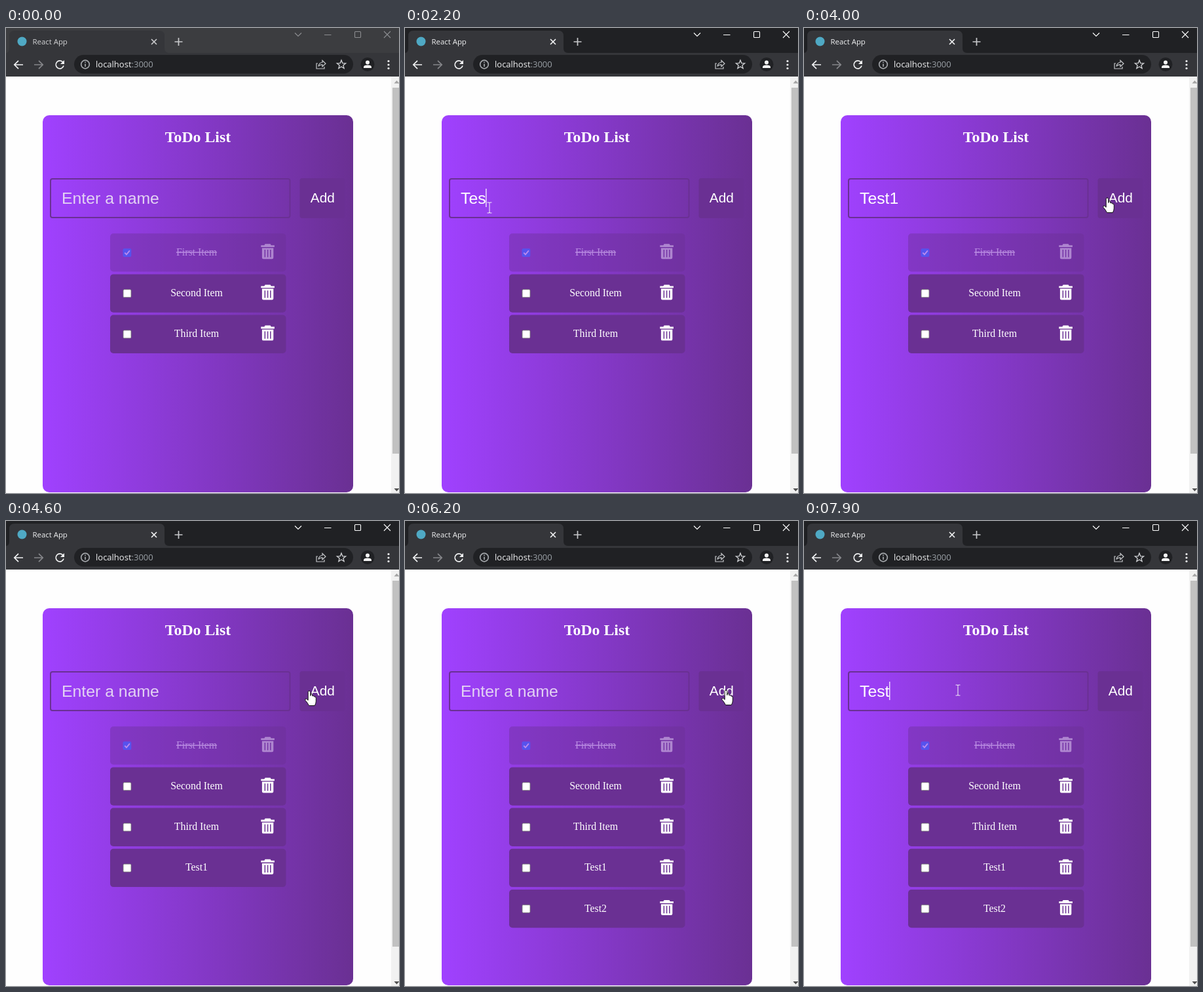
Animation of 600x709 px, one loop 8 s. Source, as an HTML page:

```html
<!DOCTYPE html>
<html lang="en">
<head>
<meta charset="utf-8">
<title>ToDo List</title>
<style>
  html, body { margin: 0; width: 100%; height: 100%; overflow: hidden; background: #fefefe; }
  svg { display: block; width: 600px; height: 709px; }
  .ui { font-family: "Open Sans", "Noto Sans", sans-serif; }
  .sans { font-family: "Liberation Sans", Arial, sans-serif; }
  .serif { font-family: "Liberation Serif", "Times New Roman", serif; fill: #fff; text-anchor: middle; }
  .line { fill: none; stroke-width: 1.7; }
</style>
</head>
<body>
<svg viewBox="0 0 600 709">
  <defs>
    <linearGradient id="purple">
      <stop offset="0" stop-color="#a041ff"/>
      <stop offset="1" stop-color="#6a3093"/>
    </linearGradient>
    <g id="trash">
      <path fill="#fff" fill-rule="evenodd" d="M-10.3-9.8H-5.2L-4-11.8H4L5.2-9.8H10.3V-7H-10.3Z
        M-8.7-5.6H8.7V9Q8.7 11.2 6.5 11.2H-6.5Q-8.7 11.2-8.7 9Z
        M-5-3V8.4h1.5V-3Z M-.75-3V8.4h1.5V-3Z M3.5-3V8.4h1.5V-3Z"/>
    </g>
  </defs>

  <!-- Browser frame -->
  <rect width="600" height="709" fill="#fefefe"/>
  <rect id="titlebar" width="600" height="40"/>
  <path fill="#35363a" d="M0 38Q5 38 5 31V12Q5 4 13 4H234Q242 4 242 12V31Q242 38 249 38H600V74H0Z"/>
  <circle cx="24.5" cy="20.5" r="7" fill="#4fa9c4"/>
  <text id="tabName" class="ui" x="40.5" y="25" font-size="11.4">React App</text>
  <path id="tabClose" class="line" d="M222 17l8 8m0-8l-8 8"/>
  <path class="line" stroke="#c8c9cb" d="M263.500 15v12m-6-6h12"/>
  <g id="controls" fill="none" stroke-width="1.1">
    <path d="M441 7.500l5 5 5-5M486 10.500h10.500M577 5l10 10m0-10l-10 10"/>
    <rect x="532.500" y="5.500" width="9" height="9" rx="1"/>
  </g>
  <rect x="104" y="41" width="426" height="28.500" rx="14.200" fill="#202124"/>
  <path class="line" stroke="#f1f2f3" d="M26 56H13m6-6.200L12.800 56l6.200 6.200"/>
  <path class="line" stroke="#85868a" d="M43 56h13m-6-6.200l6.200 6.200-6.200 6.200"/>
  <path class="line" stroke="#f1f2f3" stroke-width="2" d="M87 52.300A6 6 0 1 0 88 57.500"/>
  <path fill="#f1f2f3" d="M89 49v6h-6Z"/>
  <circle class="line" cx="121" cy="55.500" r="6.300" stroke="#a3a6aa" stroke-width="1.4"/>
  <path class="line" stroke="#a3a6aa" d="M121 54.500v4.500m0-7.600v1.600"/>
  <text class="ui" x="137" y="60" font-size="13" fill="#f1f2f3">localhost<tspan fill="#9aa0a6">:3000</tspan></text>
  <path fill="none" stroke="#c4c6c9" stroke-width="1.2" d="M476 54h-2v8h12v-3M477 58.500q1-6 6-6v-3l5 4.700-5 4.600v-3q-4 0-6 2.700Z"/>
  <path id="star" fill="none" stroke="#d0d2d5" stroke-width="1.300"/>
  <circle cx="552" cy="55.500" r="10.500" fill="#202124"/>
  <path fill="#f5f5f5" d="M546 61v-1.200q0-3.200 6-3.200t6 3.200V61Z"/>
  <circle cx="552" cy="52.500" r="3" fill="#f5f5f5"/>
  <g fill="#f1f2f3"><circle cx="584" cy="50.500" r="1.600"/><circle cx="584" cy="56" r="1.600"/><circle cx="584" cy="61.500" r="1.600"/></g>

  <!-- Scrollbar -->
  <rect x="588" y="74" width="12" height="635" fill="#f1f1f1"/>
  <rect x="590" y="91" width="10" height="558" fill="#c1c1c1"/>
  <path fill="#a3a3a3" d="M592.500 84.500l4-4.500 4 4.500Z"/>
  <path fill="#505050" d="M592.500 702l4 4.500 4-4.500Z"/>

  <!-- Todo card -->
  <rect x="56" y="133" width="474" height="575" rx="10" fill="url(#purple)"/>
  <text class="serif" x="293" y="174" font-size="23.8" font-weight="bold">ToDo List</text>
  <rect x="68" y="230" width="365.500" height="59" rx="3" fill="none" stroke="#6a3093" stroke-width="2"/>
  <text id="entry" class="sans" x="85" y="267.500" font-size="24.8"></text>
  <rect id="caret" y="245" width="1.200" height="28" fill="#fff"/>
  <rect x="448.500" y="229" width="69" height="61" rx="4" fill="#6a3093"/>
  <text class="sans" x="483.300" y="266" font-size="20.83" fill="#fff" text-anchor="middle">Add</text>
  <g id="list"></g>

  <!-- Pointers, each with its hot spot at 0,0 -->
  <g id="pointer">
    <path id="beam" fill="none" stroke="#eee8f5" stroke-width="1.100"
      d="M-3.500-8h2.500l1 1 1-1h2.500M0-7V7M-3.500 8h2.500l1-1 1 1h2.500"/>
    <path id="hand" fill="#fff" stroke="#111" stroke-linejoin="round"
      d="M-1.800 1.500Q-1.800 0 0 0t1.800 1.500V7.500Q3-.2 5 8 7 6.300 7.700 9 10 8 10.300 11V16Q10.300 19 8.300 22.500H-.5Q-2.500 18-6 14.500-7 12-4.500 12L-1.800 14.300Z"/>
    <path id="arrow" fill="#fff" stroke="#111" d="M0 0V16.500l3.800-3.600 2.500 6 2.600-1.100-2.500-5.800h5.300Z"/>
  </g>
</svg>
<script>
const LOOP = 8000, STEP = 100;
const PLACEHOLDER = "Enter a name";
const $ = id => document.getElementById(id);

// [time, text in the field, focused]
const edits = [
  [0, "", false], [1000, "", true],
  [2000, "T", true], [2100, "Te", true], [2200, "Tes", true], [2300, "Test", true], [2500, "Test1", true],
  [4300, "", false], [4900, "", true],
  [5200, "T", true], [5300, "Te", true], [5400, "Tes", true], [5500, "Test", true], [5700, "Test2", true],
  [6200, "", false], [7000, "", true],
  [7600, "T", true], [7700, "Te", true], [7800, "Tes", true], [7900, "Test", true]
];

// [time, x, y] of the pointer
const path = [
  [400, 600, 440], [900, 131, 280], [1800, 131, 280], [2200, 129, 274], [3200, 129, 274],
  [3600, 410, 266], [4000, 463, 259], [4300, 472, 258], [4600, 463, 259], [4900, 419, 255],
  [5700, 419, 255], [6100, 490, 258], [6300, 490, 258], [6600, 234, 257], [7300, 235, 258]
];

const items = [
  ["First Item", 0], ["Second Item", 0], ["Third Item", 0], ["Test1", 4300], ["Test2", 6200]
];

function itemMarkup([name], i) {
  const done = i === 0;
  const box = done
    ? `<rect x="178.500" y="23" width="12.800" height="12.800" rx="2" fill="#0075ff"/>
       <path d="M181.300 29.500l2.600 2.700 5-6" fill="none" stroke="#fff" stroke-width="1.800"/>`
    : `<rect x="179" y="23.300" width="12" height="12" rx="1.500" fill="#fff" stroke="#767676" stroke-width=".9"/>`;
  const strike = done ? `text-decoration="line-through"` : "";
  return `<g transform="translate(0 ${313.2 + i * 62.2})" ${done ? 'opacity=".4"' : ""}>
    <rect x="159" width="268.500" height="58.300" rx="5" fill="#6a3093"/>${box}
    <text class="serif" x="291" y="33.500" font-size="15.87" ${strike}>${name}</text>
    <use href="#trash" x="399.600" y="27.800"/></g>`;
}

function starPath(cx, cy, outer, inner) {
  const points = Array.from({ length: 10 }, (_, i) => {
    const r = i % 2 ? inner : outer, a = i * Math.PI / 5;
    return `${cx + r * Math.sin(a)} ${cy - r * Math.cos(a)}`;
  });
  return `M${points.join("L")}Z`;
}

$("list").innerHTML = items.map(itemMarkup).join("");
$("star").setAttribute("d", starPath(512, 56, 7, 3));

const show = (el, on) => el.setAttribute("visibility", on ? "visible" : "hidden");
const within = (x, y, l, t, r, b) => x >= l && x <= r && y >= t && y <= b;

function pointerAt(t) {
  const next = path.findIndex(p => p[0] > t);
  if (next < 0) return path[path.length - 1].slice(1);
  if (next === 0) return null;
  const [t0, x0, y0] = path[next - 1], [t1, x1, y1] = path[next];
  const u = (t - t0) / (t1 - t0), k = u * u * (3 - 2 * u);
  return [x0 + (x1 - x0) * k, y0 + (y1 - y0) * k];
}

function drawWindow(active) {
  $("titlebar").setAttribute("fill", active ? "#202124" : "#3c3d40");
  $("tabName").setAttribute("fill", active ? "#f1f2f3" : "#d3d4d6");
  $("tabClose").setAttribute("stroke", active ? "#f1f2f3" : "#c8c9cb");
  $("controls").setAttribute("stroke", active ? "#fff" : "#8c8d90");
}

function drawField(t) {
  const [since, text, focused] = edits.filter(e => e[0] <= t).pop();
  const entry = $("entry");
  entry.textContent = text || PLACEHOLDER;
  entry.setAttribute("fill", text ? "#fff" : "#e3d3f3");
  $("caret").setAttribute("x", 84.7 + (text ? entry.getComputedTextLength() : 0));
  show($("caret"), focused && Math.floor((t - since) / 500) % 2 === 0);
}

function drawPointer(t) {
  const at = pointerAt(t);
  let kind = "";
  if (at) {
    const [x, y] = at;
    kind = within(x, y, 67, 229, 434, 290) ? "beam"
      : within(x, y, 448, 229, 518, 290) ? "hand" : "arrow";
    $("pointer").setAttribute("transform", `translate(${x} ${y})`);
  }
  for (const id of ["beam", "hand", "arrow"]) show($(id), id === kind);
}

function draw(now) {
  const t = Math.floor((now % LOOP) / STEP) * STEP;
  drawWindow(t >= 1000);
  drawField(t);
  items.forEach(([, added], i) => show($("list").children[i], t >= added));
  drawPointer(t);
}

const start = performance.now();
function tick() {
  draw(performance.now() - start);
  requestAnimationFrame(tick);
}
tick();
</script>
</body>
</html>
```
